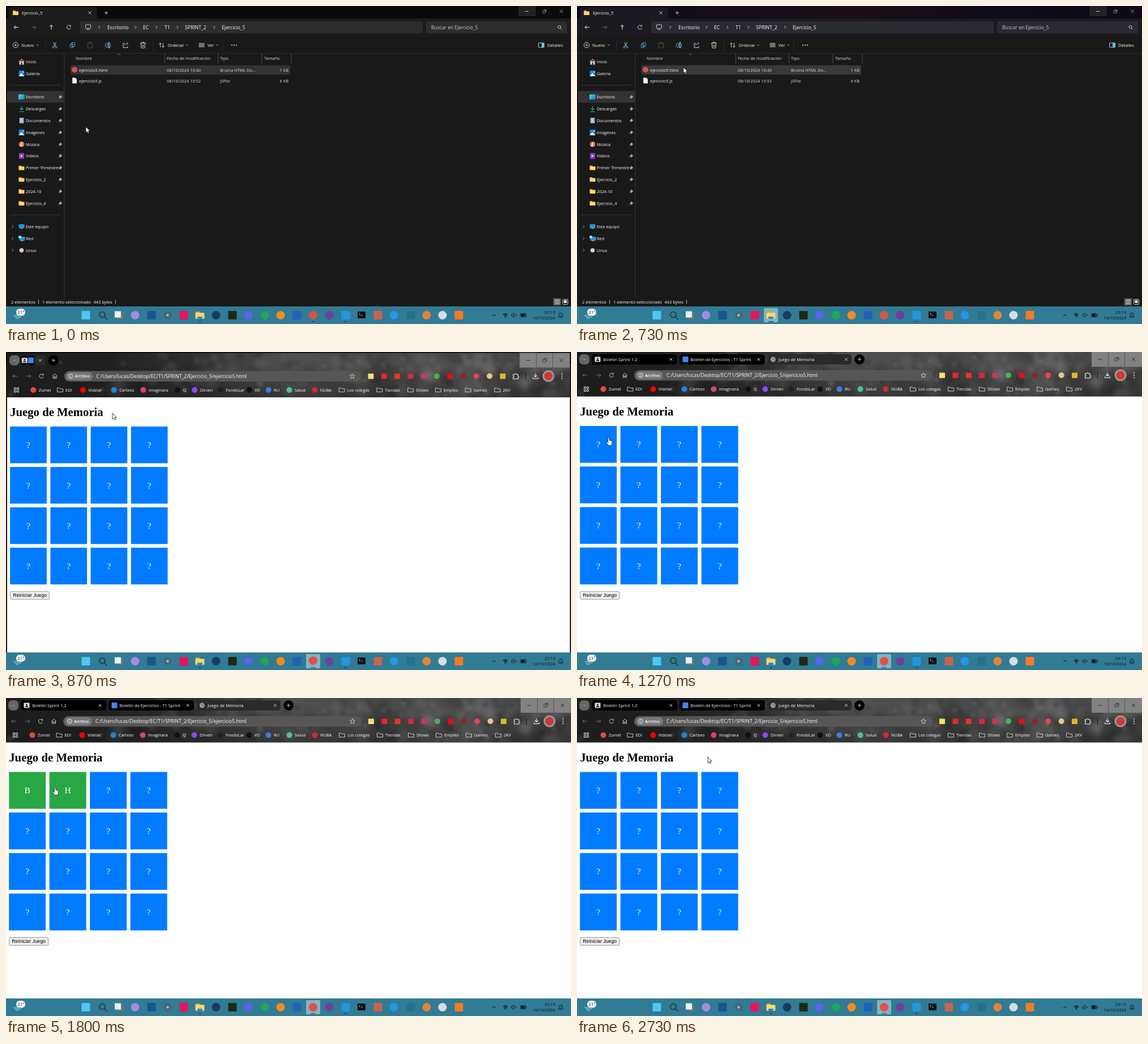
An HTML page with a canvas that plays this animation: 998x561 px, repeating every 3.6 s.

```html
<!DOCTYPE html>
<html lang="es">
<head>
<meta charset="utf-8">
<title>Juego de Memoria</title>
<style>
html, body { margin: 0; width: 100%; height: 100%; overflow: hidden; background: #191919; }
canvas { display: block; }
</style>
</head>
<body>
<canvas id="stage" width="998" height="561"></canvas>
<script>
const g = document.getElementById('stage').getContext('2d');
const UI = '"Open Sans", "Noto Sans", sans-serif';
const LOOP = 3600, STEP = 1000 / 15;
const lerp = (a, b, t) => a + (b - a) * t;

// Drawing helpers
function rect(x, y, w, h, color, r = 0) {
  g.fillStyle = color;
  g.beginPath();
  g.roundRect(x, y, w, h, r);
  g.fill();
}
function box(x, y, w, h, color = '#ddd', r = 1, lw = .9) {
  g.strokeStyle = color;
  g.lineWidth = lw;
  g.beginPath();
  g.roundRect(x, y, w, h, r);
  g.stroke();
}
function dot(x, y, r, color) {
  g.fillStyle = color;
  g.beginPath();
  g.arc(x, y, r, 0, 7);
  g.fill();
}
function arc(x, y, r, color = '#ddd', a = 0, b = 2 * Math.PI, lw = .9) {
  g.strokeStyle = color;
  g.lineWidth = lw;
  g.beginPath();
  g.arc(x, y, r, a, b);
  g.stroke();
}
// SVG path data placed at x, y: stroked, and filled when fill is given
function path(x, y, d, color = '#ddd', lw = .9, fill) {
  g.save();
  g.translate(x, y);
  const p = new Path2D(d);
  if (fill) { g.fillStyle = fill; g.fill(p); }
  if (color) { g.strokeStyle = color; g.lineWidth = lw; g.stroke(p); }
  g.restore();
}
// y is the middle of the capitals
function text(s, x, y, size = 7.45, color = '#fff', align = 'left', font = UI, weight = '') {
  g.font = `${weight} ${size}px ${font}`;
  g.fillStyle = color;
  g.textAlign = align;
  g.fillText(s, x, y + size * .36);
}
function clip(x, y, w, h, draw) {
  g.save();
  g.beginPath();
  g.rect(x, y, w, h);
  g.clip();
  draw();
  g.restore();
}
function shade(x0, y0, x1, y1, ...colors) {
  const s = g.createLinearGradient(x0, y0, x1, y1);
  colors.forEach((c, i) => s.addColorStop(i / (colors.length - 1), c));
  return s;
}

// Small icons
const chevron = (x, y, color = '#ddd') => path(x, y, 'M-1.5-2.5L1 0L-1.5 2.5', color);
const caret = (x, y, up = 1) => path(x, y, `M-2 ${-up}L0 ${up}L2 ${-up}`, '#bbb', .8);
const cross = (x, y, r = 2.5, color) => path(x, y, `M${-r} ${-r}L${r} ${r}M${r} ${-r}L${-r} ${r}`, color);
const plus = (x, y, r = 3) => path(x, y, `M${-r} 0H${r}M0 ${-r}V${r}`);
const arrow = (x, y, color, turn = 0) => {
  g.save();
  g.translate(x, y);
  g.rotate(turn);
  path(0, 0, 'M4 0H-4M-.8-3.2L-4 0L-.8 3.2', color, 1);
  g.restore();
};
const reload = (x, y) => { arc(x, y, 3.5, '#ddd', .3, 5.6); path(x, y, 'M3.5-4V-1.8H1.2'); };
const lens = (x, y, r = 2.5, color = '#ddd', lw = .9) => {
  arc(x, y, r, color, 0, 7, lw);
  path(x, y, `M${r * .7} ${r * .7}L${r * 1.7} ${r * 1.7}`, color, lw);
};
function folder(x, y, s = 1) {
  rect(x - 5 * s, y - 4 * s, 5 * s, 4 * s, '#e5a92b', s);
  rect(x - 5 * s, y - 2.6 * s, 10 * s, 6.6 * s, '#ffd764', s);
}
const outlineFolder = (x, y) => path(x, y, 'M-5-3.5H-1.5L0-2H5V3.5H-5Z', '#ddd', .9);
const monitor = (x, y, color) => {
  rect(x - 5, y - 4, 10, 7, color, 1);
  rect(x - 2, y + 3, 4, 1, '#aaa');
};
const picture = (x, y) => {
  rect(x - 5, y - 5, 10, 10, '#1f80d4', 1);
  path(x, y, 'M-5 5L-.5-1L5 5Z', null, 0, '#d9f0ff');
  dot(x + 2.5, y - 2.5, 1, '#fff');
};

const sideIcons = {
  home(x, y) { path(x, y, 'M-4-1V5H-1V1H1V5H4V-1Z', null, 0, '#d8d8dc'); path(x, y, 'M-5 0L0-4.5L5 0', '#ee7b4a', 1.5); },
  picture,
  desk(x, y) { rect(x - 5.5, y - 4.5, 11, 9, shade(x - 5, y - 4, x + 5, y + 4, '#55d3ee', '#0d79c6'), 1); },
  down(x, y) { path(x, y, 'M0-5V2M-3-1L0 2L3-1M-4 5H4', '#25b596', 1.1); },
  doc(x, y) { rect(x - 4, y - 5, 8, 10, '#8fa9c4', 1); path(x, y, 'M-2-2H2M-2 0H2M-2 2H2', '#fff', .8); },
  music(x, y) { dot(x, y, 5, '#dd735e'); path(x, y, 'M0 2V-3L2-2', '#fff', .9); dot(x - 1, y + 2, 1.3, '#fff'); },
  video(x, y) { rect(x - 4.5, y - 5, 9, 10, '#8b42d2', 1); path(x, y, 'M-1.5-2L2 0L-1.5 2Z', null, 0, '#fff'); },
  folder,
  pc(x, y) { monitor(x, y, '#2294d8'); },
  net(x, y) { monitor(x + 1, y + 1, '#2494d6'); dot(x - 3, y - 2.5, 2.6, '#a6d8ee'); },
  plain(x, y) { dot(x, y, 3.8, '#d9d2bd'); }
};
const sidebar = [
  ['Inicio', 98.5, 'home'], ['Galería', 119, 'picture'],
  ['Escritorio', 160.5, 'desk', 1], ['Descargas', 181.5, 'down', 1], ['Documentos', 202, 'doc', 1],
  ['Imágenes', 223, 'picture', 1], ['Música', 244, 'music', 1], ['Vídeos', 264.5, 'video', 1],
  ['Primer Trimestre', 285.5, 'folder', 1], ['Ejercicio_2', 306, 'folder', 1],
  ['2024-10', 327, 'folder', 1], ['Ejercicio_4', 348, 'folder', 1],
  ['Este equipo', 389, 'pc', 2], ['Red', 410, 'net', 2], ['Linux', 431, 'plain', 2]
];

function explorer(active, hover) {
  rect(0, 0, 998, 530, '#191919');
  rect(0, 0, 998, 22, active ? shade(0, 0, 998, 0, '#0b0b18', '#150d1b', '#1b0d14', '#100c1c', '#0b0a16') : '#0a0a0a');
  rect(0, 22, 998, 32, active ? '#1b1a21' : '#1c1c1c');
  rect(5, 2, 156, 21, active ? '#1b1a21' : '#1c1c1c', [5, 5, 0, 0]);
  folder(17, 12);
  text('Ejercicio_5', 28, 12, 7.5, '#fff', 'left', UI, '500');
  cross(148, 12);
  plus(177, 12);
  rect(905, 0, 31, 18, '#222');
  path(920, 9.5, 'M-3 0H3');
  box(948, 8, 4.5, 4.5, '#aaa', .5, .8);
  path(950, 7, 'M0 0H4V4', '#aaa', .8);
  cross(981, 9.5, 3, '#aaa');

  arrow(18, 37.5, '#eee');
  arrow(49, 37.5, '#666', Math.PI);
  arrow(80, 37.5, '#eee', Math.PI / 2);
  reload(111, 37.5);
  const field = active ? '#2b2a31' : '#2d2d2d';
  rect(131, 27, 605, 21, field, 2);
  rect(742, 27, 249, 21, field, 2);
  box(140.5, 33, 9, 6.5);
  path(145, 41.5, 'M-2.5 0H2.5');
  [165, 229, 266, 303, 368].forEach(x => chevron(x, 37.5));
  [['Escritorio', 179], ['EC', 242], ['T1', 280], ['SPRINT_2', 316], ['Ejercicio_5', 381]]
    .forEach(([s, x]) => text(s, x, 37.5, 8.6));
  text('Buscar en Ejercicio_5', 751, 37.5, 8.5, '#ccc');
  lens(977.5, 37);

  arc(17, 69, 4.7);
  plus(17, 69, 2.3);
  text('Nuevo', 27, 69);
  [[56, 69], [320, 69], [373, 69]].forEach(p => caret(...p));
  [69.5, 259.5, 382.5].forEach(x => rect(x, 59, .8, 21, '#333'));
  path(86, 69, 'M-2.5-5L2 2.5M2.5-5L-2 2.5');
  arc(83.5, 72.5, 1.6, '#4cc2ff');
  arc(88.5, 72.5, 1.6, '#4cc2ff');
  box(113.5, 67, 5, 6.5, '#4cc2ff');
  box(116, 64.5, 5.5, 7, '#4cc2ff');
  box(144.5, 65, 8, 9, '#555');
  box(147, 64, 3, 2, '#555');
  box(175.5, 66, 9, 6.5, '#4cc2ff');
  text('A', 178, 69, 6);
  path(182, 69, 'M-1-5H1M0-5V5M-1 5H1');
  path(211, 69, 'M-1-3H-4V4.5H4V2', '#ddd');
  path(211, 69, 'M-2 1Q-1-3 4-3M2-5L4.5-3L2-.5', '#4cc2ff');
  path(242, 69, 'M-5-3.5H5M-2-3.5V-5H2V-3.5M-3.8-3.5L-3 5H3L3.8-3.5M-1-1V3M1-1V3');
  path(275, 69, 'M-2.5 4V-4M-5-1.5L-2.5-4L0-1.5M2.5-4V4M0 1.5L2.5 4L5 1.5');
  text('Ordenar', 285.5, 69);
  path(345.5, 69, 'M-5-3H5M-5-1H5M-5 1H5M-5 3H5');
  text('Ver', 356, 69);
  [399, 403, 407].forEach(x => dot(x, 69, 1, '#eee'));
  box(940.5, 65, 10, 8, '#ddd');
  rect(946, 65, 4.5, 8, '#4cc2ff');
  text('Detalles', 956, 69);
  rect(0, 83, 998, .8, '#363636');

  rect(2, 150, 100, 20.5, '#333', 2);
  sidebar.forEach(([s, y, icon, kind]) => {
    sideIcons[icon](27.5, y);
    text(s, 35, y, 7.35);
    if (kind === 1) path(96, y, 'M0-3L3 0L1.5 .5L0 2.5L-2.5 0L-.5-1.5ZM-1.2 1.2L-3 3', '#aaa', .8, '#aaa');
    if (kind === 2) chevron(12, y, '#999');
  });
  rect(7, 139.5, 89, .8, '#444');
  rect(7, 368, 89, .8, '#444');
  rect(102.5, 84, .9, 431, '#3a3a3a');

  caret(200, 85.5, -1);
  [280, 374, 451.5, 503.5].forEach(x => rect(x, 84, .9, 17, '#555'));
  [['Nombre', 123], ['Fecha de modificación', 284], ['Tipo', 378], ['Tamaño', 456]]
    .forEach(([s, x]) => text(s, x, 92, 7.45, '#ddd'));
  rect(114, 104.5, 388, 16.5, hover ? '#393939' : '#333', 2);
  dot(121, 112.5, 5, '#dd5144');
  path(121, 131.5, 'M-3.8-5H1.5L4-2.5V5H-3.8Z', null, 0, '#f2f2f2');
  path(122.5, 126.5, 'M0 0V2.5H2.5', '#aaa', .7);
  [['ejercicio5.html', '08/10/2024 10:40', 'Bruma HTML Do...', '1 KB', 113],
   ['ejercicio5.js', '08/10/2024 10:52', 'JSFile', '6 KB', 132]].forEach(([name, date, type, size, y]) => {
    text(name, 129, y, 7.4);
    text(date, 284, y, 7.4, '#ddd');
    text(type, 378, y, 7.4, '#ddd');
    text(size, 499, y, 7.4, '#ddd', 'right');
  });

  text('2 elementos', 9, 522);
  text('1 elemento seleccionado', 64, 522);
  text('443 bytes', 154.5, 522);
  rect(57, 518.5, .8, 7, '#ddd');
  rect(193, 518.5, .8, 7, '#ddd');
  rect(966.5, 515.5, 14, 13, '#555');
  path(973.5, 522, 'M-4.5-3.5H4.5M-4.5-1.2H4.5M-4.5 1.2H4.5M-4.5 3.5H4.5', '#eee', .9);
  box(983.5, 517.5, 9, 9, '#eee');
  rect(985.5, 519, 5, 5, '#eee');
}

// Taskbar marks: x, colour, 1 for a square
const marks = [
  [141, '#4ec5f3', 1], [228, '#a58be0'], [257, '#17568f', 1], [314, '#e6155b', 1],
  [371, '#173a63'], [400, '#1e2a12', 1], [428, '#5865f2'], [457, '#20a65a'], [485, '#f28a22'],
  [514, '#2360bd', 1], [571, '#6e3fa0'], [600, '#2097df', 1], [657, '#c9654d', 1],
  [685, '#2396ed'], [715, '#23728b', 1], [743, '#e2823b'], [771, '#d9dce0'], [800, '#f47b22', 1]
];
function taskbar(k) {
  rect(0, 530, 998, 31, '#317b94');
  const files = k >= 3 && k < 13, web = k >= 12;
  const glow = x => rect(x, 533, 25, 25, 'rgba(255,255,255,.42)', 2);
  if (files) glow(330);
  if (web) glow(530);
  marks.forEach(([x, c, square]) => square ? rect(x - 7.5, 538, 15, 15, c, 1) : dot(x, 545.5, 7.5, c));
  dot(542.5, k > 12 && k < 18 ? 544.5 : 545.5, 7.5, '#dd5144');
  lens(170, 544.5, 5, '#25313b', 1.6);
  rect(195.5, 541, 11, 11, '#777');
  rect(192, 538.5, 11, 11, '#eee');
  arc(285.5, 545.5, 5, '#53606e', 0, 7, 3);
  for (let i = 0; i < 8; i++) dot(285.5 + 6.5 * Math.cos(i * Math.PI / 4), 545.5 + 6.5 * Math.sin(i * Math.PI / 4), 1.3, '#53606e');
  dot(285.5, 545.5, 2, '#9bc8e0');
  folder(342.5, 545.5, 1.6);
  rect(338, 548, 9, 4, '#2c8bd6', 1);
  rect(621, 539, 14, 12, '#101010', 1);
  path(625, 543.5, 'M-1.5-1.5L.5 0L-1.5 1.5M2 2H4.5', '#fff', .8);
  const dash = (x, w, c) => rect(x - w / 2, 556, w, 1.6, c, 1);
  dash(342.5, files ? 9 : 4, files ? '#264d63' : '#24343d');
  dash(599.5, 4, '#24343d');
  if (k < 9) dash(542.5, 4, '#24343d');
  if (web) dash(542.5, 9, '#1c67b0');

  path(19, 546, 'M-6 0H3Q5-2 2-3M-4 2.5H8M-2 5H4', '#9fd8f5', 1.2);
  rect(18, 534, 16, 12.5, '#f4f4f4', 6);
  text('21°', 26.5, 540, 7.5, '#222', 'center');
  path(862, 545.5, 'M-3 1.5L0-1.5L3 1.5', '#111', 1);
  [1.7, 3.7, 5.6].forEach(r => arc(882, 548.5, r, '#111', -2.4, -.74, 1.1));
  dot(882, 548.5, 1, '#111');
  path(897, 545.5, 'M-4-1.5H-2.5L0-4V4L-2.5 1.5H-4ZM2-1.5L5 1.5M5-1.5L2 1.5', '#111', .8);
  box(909, 542.5, 9, 6, '#111');
  rect(910, 543.5, 6, 4, '#111');
  rect(918.5, 544, 1, 3, '#111');
  text('20:13', 970, 540, 7.5, '#111', 'right');
  text('16/10/2024', 970, 550.5, 7.5, '#111', 'right');
  path(980, 545.5, 'M-4 3L-3 1V-1A3 3 0 0 1 3-1V1L4 3ZM-1 4.5H1', '#111', .9);
  text('z', 979, 545, 5, '#111');
}

const bookmarks = [
  ['Zumel', 56, '#e04b3c'], ['EDI', 103.5], ['Videlar', 144, '#f00'], ['Cartexo', 199, '#1a86d9'],
  ['Imaginara', 251, '#d8417c'], ['Q', 312, '#111'], ['Dirven', 342, '#9146ff'], ['FondoLar', 388, '#222'],
  ['VD', 439, '#111'], ['RU', 473, '#3f7de0'], ['Salud', 510, '#4ebfa5'], ['NUBA', 555, '#d9272e'],
  ['Los colegas', 603], ['Tiendas', 670], ['Shows', 725], ['Empleo', 774], ['Games', 827], ['2KV', 879]
];
const extensions = ['#f2e06a', '#e5262c', '#e8322c', '#d7263d', '#c9385a', '#4caf50', '#e00f1b', '#8d2525', '#e54358', '#e9c58c', '#e0b81f'];
const tabs = ['Boletín Sprint 1.2', 'Boletín de Ejercicios - T1 Sprint', 'Juego de Memoria'];

// Dark stone texture made of soft seeded patches
function stone() {
  rect(0, 0, 998, 78.5, shade(0, 0, 998, 30, '#1d1d1d', '#202020', '#303030', '#505050', '#484848', '#565656', '#484848'));
  rect(0, 0, 998, 78.5, shade(0, 20, 0, 78, 'rgba(28,28,28,0)', 'rgba(28,28,28,.45)'));
  let seed = 7;
  const rnd = () => (seed = seed * 16807 % 2147483647) / 2147483647;
  clip(0, 0, 998, 78.5, () => {
    for (let i = 0; i < 240; i++) {
      const x = 998 * Math.sqrt(rnd()), y = 78 * rnd(), r = 5 + 16 * rnd(), tone = rnd() < .5 ? '150,150,150' : '15,15,15';
      const s = g.createRadialGradient(x, y, 0, x, y, r);
      s.addColorStop(0, `rgba(${tone},.17)`);
      s.addColorStop(1, `rgba(${tone},0)`);
      dot(x, y, r, s);
    }
  });
}

function header(open) {
  stone();
  rect(4, 4, 18, 18, '#666', 7);
  caret(13, 13);
  const w = lerp(11, 155, open), plusX = lerp(82, 499, open);
  tabs.forEach((s, i) => {
    const x = 26 + i * w, icon = x + lerp(5, 10.5, open);
    rect(x, 4, i < 2 ? w - 4 * open : plusX - 14 - x, 18, i < 2 ? '#000' : '#2a2a2a', 5);
    if (i === 2 && open < .1) return;
    clip(x, 0, Math.max(w - 26 * open, 11), 27, () => {
      if (i === 0) {
        rect(icon - 5, 8.5, 10, 9, '#ddd', 1);
        dot(icon, 12, 1.5, '#222');
        rect(icon - 2.5, 14, 5, 2, '#222');
      } else if (i === 1) rect(icon - 5, 8, 10, 10, '#4285f4', 1);
      else {
        dot(icon, 13, 4.5, '#aaa');
        path(icon, 13, 'M-3-2L0-1L-1 2M1-4L3 0L1 3', '#444');
      }
      if (open > .3) text(s, x + 20 + (i === 2 ? 0 : .5 - i), 13, 7.5);
    });
    if (open > .3 && i < 2) cross(x + w - 15, 13, 2.3);
  });
  cross(plusX - 23.5, 13, 2.3);
  dot(plusX, 13, 9, '#000');
  plus(plusX, 13);
  rect(909, 0, 89, 26, '#828282');
  [938, 967].forEach(x => rect(x, 0, 1, 26, '#555'));
  path(924, 13, 'M-3.5 0H3.5', '#222');
  box(950, 11, 5, 5, '#222', 1, .8);
  path(952, 9.5, 'M0 0H5V5', '#222', .8);
  cross(983, 13, 3.2, '#222');

  arrow(14, 41, '#777');
  arrow(38, 41, '#777', Math.PI);
  reload(61, 41);
  path(84.5, 41, 'M-4 0L0-4L4 0M-3-1V4H-1V1H1V4H3V-1');
  rect(101, 32, 527, 18.5, '#565656', 9);
  rect(104, 34, 48, 14.5, '#777', 7);
  arc(112.5, 41, 3.7, '#fff');
  path(112.5, 41, 'M0-2V-1M0 0V2', '#fff');
  text('Archivo', 120, 41, 7.3, '#fff', 'left', UI, '600');
  text('C:/Users/lucas/Desktop/EC/T1/SPRINT_2/Ejercicio_5/ejercicio5.html', 158, 41, 8.6);
  path(612, 41, 'M0-4.5L1.3-1.4L4.5-1.2L2 1L2.8 4.2L0 2.5L-2.8 4.2L-2 1L-4.5-1.2L-1.3-1.4Z', '#ddd', .8);
  extensions.forEach((c, i) => {
    const x = 645 + i * 23.4;
    i % 2 && i > 4 || i === 8 ? dot(x, 41, 5, c) : rect(x - 5, 36.5, 10, 9.5, c, 1);
  });
  path(902, 41, 'M-4.5-3H-1.5A1.5 1.5 0 0 1 1.5-3H4V0A1.5 1.5 0 0 1 4 3V5H-4.5V2A1.2 1.2 0 0 0-4.5-.5Z', '#eee', 1.1);
  rect(919, 36, 1, 11, '#111');
  path(937, 41, 'M0-5V1.5M-3-1.5L0 1.5L3-1.5M-4.5 2V4.5H4.5V2', '#eee', 1.1);
  dot(960, 41, 10.5, '#999');
  dot(960, 41, 7.5, '#cf3a32');
  [37, 41, 45].forEach(y => dot(984, y, 1, '#eee'));

  for (let i = 0; i < 4; i++) box(12.5 + i % 2 * 5, 61.5 + (i >> 1) * 5, 3, 3, '#ddd', 0, 1);
  rect(34.5, 60, 1, 11, '#111');
  bookmarks.forEach(([s, x, c]) => {
    c ? dot(x - 9.5, 65.5, 5, c) : outlineFolder(x - 9.5, 65.5);
    text(s, x, 65.5, 7.4);
  });
}

const LEFT = 5.2, TOP = 130.4, CARD = 65, PITCH = 71.5;
const cardX = i => LEFT + (i % 4) * PITCH, cardY = i => TOP + (i >> 2) * PITCH;
function game(k) {
  rect(0, 78.5, 998, 455, '#fff');
  const serif = '"Liberation Serif", "Times New Roman", serif';
  text('Juego de Memoria', LEFT, 104.3, 20.8, '#000', 'left', serif, 'bold');
  for (let i = 0; i < 16; i++) {
    const up = k < 41 && (i === 0 && k >= 21 || i === 1 && k >= 27);
    rect(cardX(i), cardY(i), CARD, CARD, up ? '#28a745' : '#007bff');
    text(up ? 'BH'[i] : '?', cardX(i) + CARD / 2, cardY(i) + CARD / 2 - .2, 15.6, '#fff', 'center', serif);
  }
  rect(LEFT, 422.2, 70, 14.5, '#efefef', 2);
  box(LEFT + .4, 422.6, 69.2, 13.7, '#767676', 2, .7);
  text('Reiniciar Juego', LEFT + 35, 429.3, 8.67, '#000', 'center', '"Liberation Sans", Arial, sans-serif');
}

// Pointer stops: step, x, y
const stops = [[0, 141, 213], [5, 188, 108], [16, 188, 108], [19, 56, 150.5], [21, 56, 150.5], [24, 86.5, 157], [27, 86.5, 157], [33, 231, 104], [54, 231, 104]];
function pointer(k) {
  const n = stops.findIndex(s => s[0] > k), [a, ax, ay] = stops[n - 1], [b, bx, by] = stops[n];
  const t = (k - a) / (b - a), e = t * t * (3 - 2 * t);
  const x = lerp(ax, bx, e), y = lerp(ay, by, e);
  const over = k > 12 && [...Array(16).keys()].some(i =>
    x >= cardX(i) && x < cardX(i) + CARD && y >= cardY(i) && y < cardY(i) + CARD);
  path(x, y, over
    ? 'M-1.2 1Q0-1 1.2 1V5L5 6Q6.5 6.5 6 9.5L5 14.5H-.5L-4 9.5Q-4.5 7-2.7 8L-1.2 9.5Z'
    : 'M0 0V10.5L2.4 8.3L4 11.8L5.7 11L4.2 7.6H7.4Z', '#111', .8, '#fff');
}

function draw(k) {
  g.clearRect(0, 0, 998, 561);
  if (k < 14) explorer(k >= 9 && k < 12, k >= 4);
  if (k === 12) rect(64, 62, 878, 466, '#fff');
  if (k >= 13) {
    const s = k === 13 ? .996 : 1;
    const open = [0, .62, .93][k - 13] ?? 1;
    clip(0, 0, 998, 530, () => {
      g.translate(499, 430);
      g.scale(s, s);
      g.translate(-499, -430);
      header(open);
      game(k);
    });
  }
  taskbar(k);
  pointer(k);
}

let last = -1;
function tick() {
  const k = Math.min(53, Math.floor((performance.now() % LOOP + 3.4) / STEP));
  if (k !== last) draw(last = k);
  requestAnimationFrame(tick);
}
tick();
</script>
</body>
</html>
```
